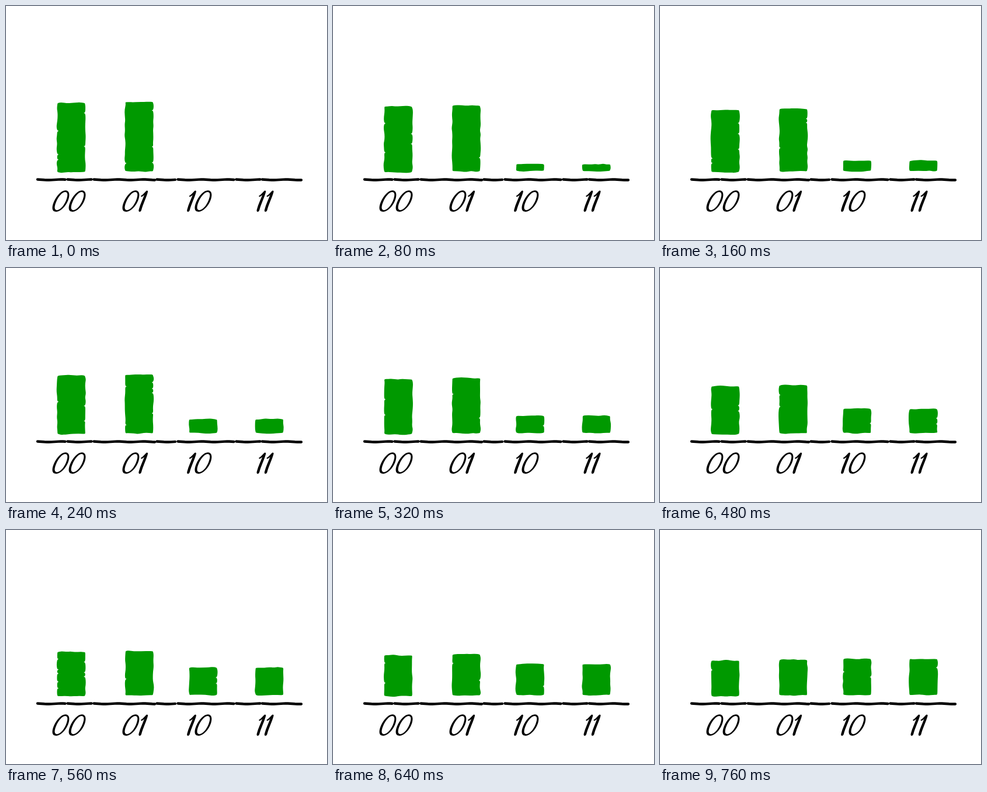
These frames come from a looping animation (550 by 400 pixels, 1.64 s). An HTML page:

```html
<!DOCTYPE html>
<html lang="en">
<head>
<meta charset="utf-8">
<title>Bars levelling out</title>
<style>
  html, body { margin: 0; width: 100%; height: 100%; overflow: hidden; background: #fff; }
  svg { display: block; width: 100vw; height: 100vh; }
  #bars { fill: #090; }
  #axis { fill: none; stroke: #000; stroke-width: 4.4; stroke-linecap: round; stroke-linejoin: round; }
</style>
</head>
<body>
<svg viewBox="0 0 550 400">
  <defs>
    <!-- hand-lettered digits, origin at their centre -->
    <path id="d0" fill-rule="evenodd" transform="skewX(-22)"
      d="M0 -18.2C7.500 -18.2 11.6 -10 11.6 -1C11.6 9 6.500 18.2 -1 18.2C-8.500 18.2 -11.8 11 -11.8 2C-11.8 -9 -6.500 -18.2 0 -18.2Z
         M1 -15.4C-4 -15.4 -7.800 -8 -7.800 2C-7.800 10 -5.500 15.4 -.5 15.4C4.500 15.4 8.200 8 8.200 -1C8.200 -10 5.500 -15.4 1 -15.4Z"/>
    <path id="d1"
      d="M4.800 -16.800Q7.600 -19.400 8.400 -16.500C5.800 -6 -.2 5 -3 16Q-4.300 18.800 -6.800 18Q-8 17 -7.200 14.600
         C-4.600 5 -.6 -3 2.200 -10.400C.4 -8.700 -1 -7.700 -2.500 -7.400Q-4.400 -7.400 -3.300 -9.200C-.2 -11.300 2.400 -14 4.800 -16.800Z"/>
  </defs>
  <g id="bars"></g>
  <path id="axis"/>
  <g id="labels"></g>
</svg>
<script>
const NS = "http://www.w3.org/2000/svg";
const STEP = 40, LAST = 19, LOOP = 1640;
const $ = id => document.getElementById(id);

function add(parent, tag, attrs) {
  const el = document.createElementNS(NS, tag);
  for (const key in attrs) el.setAttribute(key, attrs[key]);
  parent.appendChild(el);
  return el;
}

function random(seed) {
  let s = (seed * 7919 + 12345) >>> 0;
  return () => {
    s = (s + 0x6D2B79F5) >>> 0;
    let t = Math.imul(s ^ (s >>> 15), s | 1);
    t ^= t + Math.imul(t ^ (t >>> 7), t | 61);
    return ((t ^ (t >>> 14)) >>> 0) / 4294967296;
  };
}

const bars = [
  { x: 87.5, from: 165.3, to: 223, base: 284.3 },
  { x: 204, from: 163.5, to: 221.7, base: 282.8 },
  { x: 313.5, from: 275.8, to: 220, base: 282.3, grows: true },
  { x: 427, from: 275.8, to: 220.2, base: 282.3, grows: true }
].map(bar => ({ ...bar, el: add($("bars"), "path", {}) }));

// One edge of a brushed box, with soft bumps and an occasional slit.
function edge(pts, x0, y0, x1, y1, rnd, slits) {
  const len = Math.hypot(x1 - x0, y1 - y0);
  const ux = (x1 - x0) / len, uy = (y1 - y0) / len;
  const put = (d, inset) => pts.push([x0 + ux * d - uy * inset, y0 + uy * d + ux * inset]);
  const pad = Math.min(1.5, len / 4);
  put(pad, rnd() * 0.8);
  for (let d = 7; d < len - 5; d += 6 + rnd() * 5) {
    if (slits && d > 12 && d < len - 12 && rnd() < 0.16) {
      put(d - 0.7, 0.2);
      put(d, 3.5);
      put(d + 0.7, 0.2);
    } else {
      put(d, (rnd() - 0.5) * 2.2);
    }
  }
  put(len - pad, rnd() * 0.8);
}

function smooth(pts) {
  const mid = (a, b) => ((a[0] + b[0]) / 2).toFixed(2) + " " + ((a[1] + b[1]) / 2).toFixed(2);
  let d = "M" + mid(pts[pts.length - 1], pts[0]);
  pts.forEach((p, i) => {
    d += "Q" + p[0].toFixed(2) + " " + p[1].toFixed(2) + " " + mid(p, pts[(i + 1) % pts.length]);
  });
  return d + "Z";
}

function brushBox(x, top, w, base, seed) {
  const rnd = random(seed), pts = [], r = x + w;
  edge(pts, x, top, r, top, rnd, false);
  edge(pts, r, top, r, base, rnd, true);
  edge(pts, r, base, x, base, rnd, false);
  edge(pts, x, base, x, top, rnd, true);
  return smooth(pts);
}

function drawAxis() {
  const runs = [[54, 101.5], [105.5, 146.5], [150.5, 255], [258.5, 290], [294.5, 390.5], [394.5, 435.5], [439, 506]];
  let d = "";
  for (const [a, b] of runs) {
    for (let x = a; ; x = Math.min(x + 4, b)) {
      const y = 297 + 0.5 * Math.sin((x - a) / 7 - 1.2);
      d += (x === a ? "M" : "L") + x + " " + y.toFixed(2);
      if (x === b) break;
    }
  }
  $("axis").setAttribute("d", d);
}

function drawLabels() {
  const labels = { "00": [94.3, 122.4], "01": [214.3, 234.8], "10": [317.6, 338.3], "11": [437, 450.3] };
  for (const text of ["00", "01", "10", "11"]) {
    const g = add($("labels"), "g", { role: "img", "aria-label": text });
    labels[text].forEach((x, i) => add(g, "use", { href: "#d" + text[i], x, y: 333.5 }));
  }
}

let shown = -1;
function draw(time) {
  const step = Math.min(LAST, Math.floor((time % LOOP) / STEP));
  if (step === shown) return;
  shown = step;
  bars.forEach((bar, i) => {
    const top = bar.from + (bar.to - bar.from) * step / LAST;
    const hidden = bar.grows && step === 0;
    bar.el.setAttribute("d", hidden ? "" : brushBox(bar.x, top, 48.5, bar.base, step * 4 + i + 1));
  });
}

drawAxis();
drawLabels();
const start = performance.now();
function tick() {
  draw(performance.now() - start);
  requestAnimationFrame(tick);
}
tick();
</script>
</body>
</html>
```
